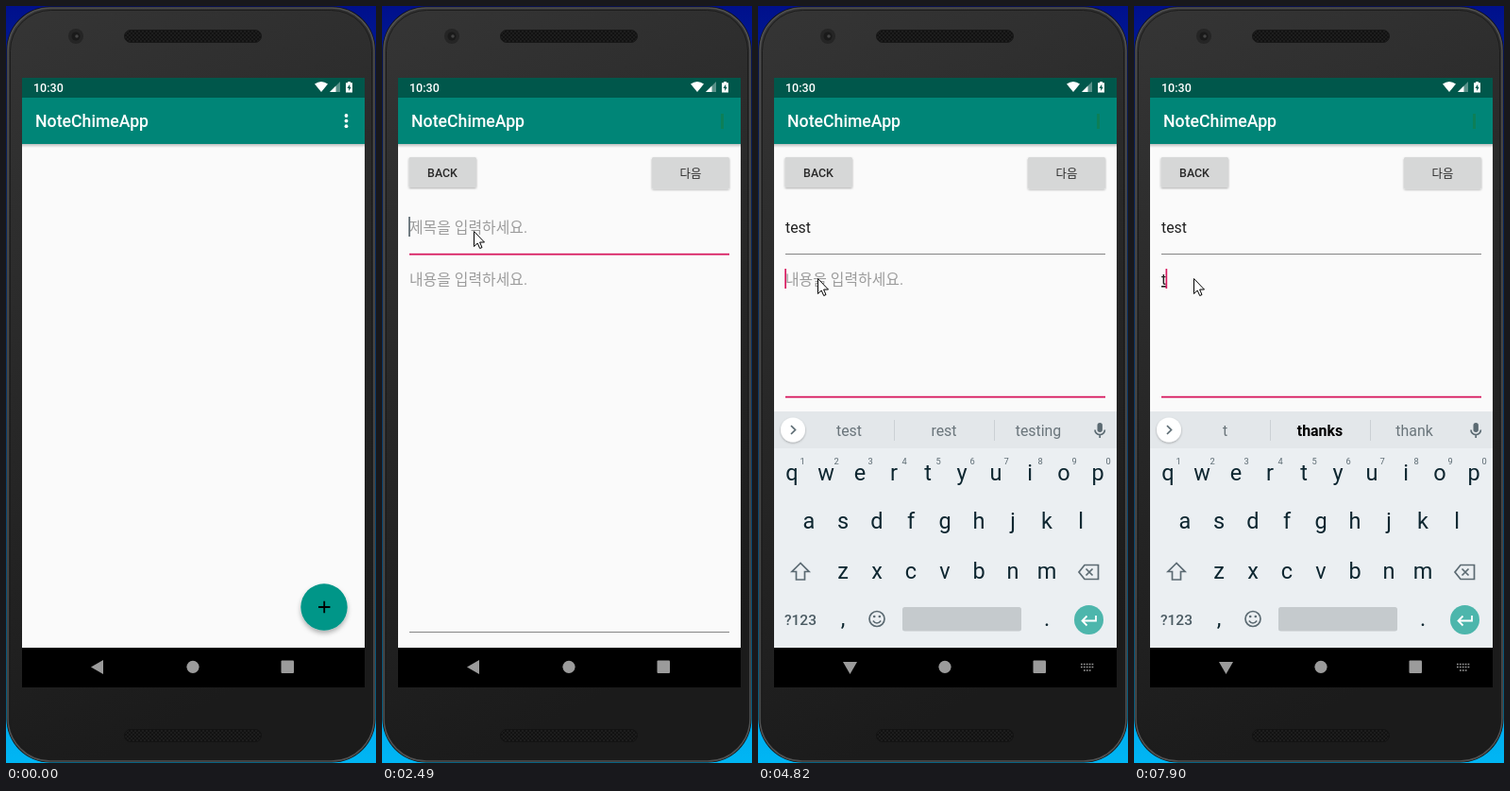
These frames come from a looping animation (392x801 px, 8 s). An HTML page:

```html
<!DOCTYPE html>
<html lang="ko">
<head>
<meta charset="utf-8">
<title>Memo screen</title>
<style>
  html, body { margin: 0; width: 100%; height: 100%; overflow: hidden; background: #000; }
  svg { display: block; width: 392px; height: 801px; }
  text { font-family: Roboto, "Noto Sans CJK KR", "Noto Sans CJK", sans-serif; white-space: pre; }
  .medium { font-weight: 500; }
  .mid { text-anchor: middle; }
  .field { font-size: 15.9px; fill: #212121; }
  .hint { font-size: 15.9px; fill: #9c9c9c; }
  .button { font-size: 12.4px; fill: #2a2a2a; }
  .key { font-size: 23.5px; fill: #0d2630; text-anchor: middle; }
  .digit { font-size: 9.3px; fill: #5c6b73; text-anchor: middle; }
  .word { font-size: 15.9px; fill: #6a757b; text-anchor: middle; }
  .strong { font-weight: 700; fill: #000; }
  .icon { fill: none; stroke: #5b6a72; stroke-width: 1.7; }
</style>
</head>
<body>
<svg viewBox="0 0 392 801">
  <defs>
    <linearGradient id="desk" x2="0" y2="1">
      <stop offset="0" stop-color="#00108c"/><stop offset=".5" stop-color="#0560c0"/><stop offset="1" stop-color="#00b6f4"/>
    </linearGradient>
    <linearGradient id="shell" x2=".25" y2="1">
      <stop offset="0" stop-color="#353535"/><stop offset=".45" stop-color="#292929"/><stop offset="1" stop-color="#1b1b1b"/>
    </linearGradient>
    <linearGradient id="fall" x2="0" y2="1">
      <stop offset="0" stop-opacity=".24"/><stop offset="1" stop-opacity="0"/>
    </linearGradient>
    <pattern id="mesh" width="4" height="4" patternUnits="userSpaceOnUse">
      <rect width="4" height="4" fill="#1d1d1d"/><circle cx="1" cy="1" r=".9" fill="#0c0c0c"/><circle cx="3" cy="3" r=".9" fill="#0c0c0c"/>
    </pattern>
    <filter id="lift" x="-30%" y="-30%" width="160%" height="170%">
      <feDropShadow dx="0" dy="3" stdDeviation="2.6" flood-opacity=".3"/>
    </filter>
    <filter id="edge" x="-10%" y="-20%" width="120%" height="150%">
      <feDropShadow dx="0" dy="1" stdDeviation=".8" flood-opacity=".3"/>
    </filter>
    <clipPath id="screen"><rect x="17" y="76" width="363" height="645"/></clipPath>
  </defs>

  <rect width="392" height="801" fill="url(#desk)"/>
  <rect x=".5" y=".5" width="391" height="800" rx="46" fill="#111"/>
  <rect x="2" y="2" width="388" height="797" rx="45" fill="url(#shell)" stroke="#505050" stroke-width="1.6"/>
  <rect x="4.5" y="4.5" width="383" height="792" rx="43" fill="none" stroke="#1c1c1c"/>
  <rect x="125.5" y="25.5" width="145" height="13" rx="6.5" fill="url(#mesh)" stroke="#171717"/>
  <rect x="125.5" y="765.5" width="145" height="13" rx="6.5" fill="url(#mesh)" stroke="#131313"/>
  <circle cx="74" cy="32" r="8" fill="#252525"/>
  <circle cx="74" cy="32" r="4.5" fill="#1a1a1a"/>
  <circle cx="75" cy="32" r="1.8" fill="#444"/>

  <g clip-path="url(#screen)">
    <rect x="17" y="76" width="363" height="603" fill="#fafafa"/>
    <rect x="17" y="146" width="363" height="4" fill="url(#fall)"/>
    <rect x="17" y="76" width="363" height="21" fill="#00574b"/>
    <rect x="17" y="97" width="363" height="49" fill="#008577"/>
    <rect x="17" y="679" width="363" height="42"/>
    <text class="medium" x="29" y="91" font-size="12.5" fill="#fff">10:30</text>
    <text class="medium" x="31" y="128" font-size="17.7" fill="#fff">NoteChimeApp</text>
    <path d="M334 91L327 82.5Q334 77.5 341 82.5Z" fill="#fff"/>
    <path d="M343 91L354 80V91Z" fill="#fff" opacity=".35"/>
    <path d="M343 91L349.500 84.500V91Z" fill="#fff"/>
    <path d="M362 80h3v1.300h2V91.500h-7V81.300h2Z" fill="#fff"/>
    <path d="M364.200 82.800l-2.700 4.200h1.700v3l2.500-4.200h-1.500Z" fill="#00574b"/>
    <rect x="359" y="114" width="3" height="16" fill="#0c7f58"/>
    <g id="home">
      <rect x="358" y="113" width="5" height="18" fill="#008577"/>
      <g fill="#fff"><circle cx="360.500" cy="116" r="1.900"/><circle cx="360.500" cy="121.600" r="1.900"/><circle cx="360.500" cy="127.200" r="1.900"/></g>
      <circle cx="337" cy="636" r="24.700" fill="#009688" filter="url(#lift)"/>
      <path d="M331 636h12.400M337.200 629.800v12.400" stroke="#000" stroke-width="1.800"/>
    </g>

    <g id="edit">
      <g fill="#d6d7d7" filter="url(#edge)">
        <rect x="28.500" y="160" width="71.500" height="32" rx="1.500"/>
        <rect x="286" y="160" width="82" height="33.500" rx="1.500"/>
      </g>
      <text class="button medium mid" x="64" y="181">BACK</text>
      <text class="button mid" x="327" y="181.500">다음</text>
      <text class="hint" id="titleHint" x="29" y="240">제목을 입력하세요.</text>
      <text class="field" id="title" x="29" y="240"></text>
      <rect id="titleCaret" y="223" width="1.400" height="21" fill="#37474f"/>
      <rect id="titleLine" x="29" width="339"/>
      <text class="hint" id="bodyHint" x="29" y="295">내용을 입력하세요.</text>
      <text class="field" id="body" x="29" y="295"></text>
      <rect id="bodyCaret" y="278" width="1.700" height="21" fill="#d81b60"/>
      <rect id="bodyLine" x="29" width="339"/>
    </g>

    <g id="keyboard">
      <rect x="17" y="429" width="363" height="250" fill="#ebeff2"/>
      <rect x="17" y="429" width="363" height="39" fill="#e3e7ea"/>
      <path d="M144.500 438v22M250.500 438v22" stroke="#cbd0d4"/>
      <circle cx="37" cy="448.500" r="13" fill="#fff" filter="url(#edge)"/>
      <path class="icon" d="M35 444l4.500 4.500-4.500 4.500"/>
      <text class="word" x="96.500" y="455"></text>
      <text class="word" x="197" y="455"></text>
      <text class="word" x="297" y="455"></text>
      <rect x="359.500" y="441" width="5.400" height="10" rx="2.700" fill="#5b6a72"/>
      <path class="icon" d="M357 448.500a5.200 5.200 0 0 0 10.400 0M362.200 453.500v3.500"/>
      <g id="keys"></g>
      <path class="icon" d="M45 589.500l-9 9h4.500v8.500h9v-8.500h4.500Z"/>
      <path class="icon" d="M346 591.500h14.500v15H346l-6-7.500ZM347.500 595.500l7 7M354.500 595.500l-7 7"/>
      <text class="medium mid" x="45" y="654.500" font-size="15.500" fill="#4b5b63">?123</text>
      <circle class="icon" cx="126" cy="648.500" r="8"/>
      <path class="icon" d="M121.800 650.500q4.200 5 8.400 0"/>
      <circle cx="123.200" cy="646" r="1.300" fill="#5b6a72"/><circle cx="128.800" cy="646" r="1.300" fill="#5b6a72"/>
      <rect x="153" y="636" width="126" height="25.500" rx="2.500" fill="#c5cacd"/>
      <circle cx="350.500" cy="649.500" r="15.500" fill="#4db6ac"/>
      <path d="M358 645v5.500H344M348.500 645.500l-5 5 5 5" fill="none" stroke="#fff" stroke-width="1.800"/>
    </g>

    <g fill="#9b9b9b">
      <path id="back"/>
      <circle cx="198" cy="699.300" r="6.600"/>
      <rect x="291.500" y="692.500" width="13.500" height="13.500" rx="1"/>
      <path id="switcher" d="M342 696.500h14M342 699.500h14M345 703h8" stroke="#9b9b9b" stroke-width="1.500" stroke-dasharray="1.700 1.200"/>
    </g>
  </g>
  <path id="pointer" d="M.5.5V16.500L4.200 13 6.700 18.500 9 17.500 6.600 12H11.500Z" fill="#fff" stroke="#000"/>
</svg>
<script>
const LOOP = 8000;
const $ = id => document.getElementById(id);
const words = [...document.querySelectorAll(".word")];

// Each row: start time, then the values held until the next row.
const pointerSteps = [
  [220, 331, 737], [295, 333, 712], [370, 336, 678], [445, 338, 655], [520, 339, 646],
  [1100, 250, 520], [1175, 110, 322], [1250, 56, 257],
  [1480, 59, 241], [1558, 73, 231], [1635, 86, 229], [1712, 94, 234], [1790, 97, 238],
  [4280, 95, 242], [4357, 90, 251], [4434, 83, 263], [4511, 75, 274], [4588, 68, 283], [4665, 63, 288]
];
const fadeSteps = [[0, 0], [690, .15], [770, .5], [850, .85], [930, 1]];
const keyboardSteps = [[3420, 62, .49], [3497, 28, .76], [3573, 8, .95], [3650, 0, 1]];
const titleSteps = [[0, ""], [3420, "te"], [3573, "tes"], [3650, "test"]];
const bodySteps = [
  [0, ""], [5360, "t"], [5510, "te"], [5590, "tes"], [5740, "tesets"],
  [6597, "teset"], [6674, "tese"], [6828, "tes"], [6982, "te"], [7136, "t"], [7290, ""], [7830, "t"]
];
// A leading * marks the bold suggestion.
const wordSteps = [
  [0, "test rest testing"], [5130, "Thanks I The"], [5360, "t *thanks thank"], [5510, "te *the yes"],
  [5590, "tese *these year"], [5740, "tesets *resets theses"], [6597, "teset *reset tests"],
  [6674, "tese *these year"], [6982, "te *the yes"], [7136, "t *thanks thank"],
  [7370, "Thanks I The"], [7900, "t *thanks thank"]
];
const titleCaretSteps = [[0, 0], [2490, 1], [3190, 0], [3420, 1], [4050, 0]];
const bodyCaretSteps = [[0, 0], [4820, 1], [6290, 0], [6520, 1]];
const TITLE_FOCUS = 2340, BODY_FOCUS = 4820;

const at = (steps, t) => steps.findLast(row => row[0] <= t);
const show = (el, on) => el.setAttribute("visibility", on ? "inherit" : "hidden");

function drawKeys() {
  const rows = [["qwertyuiop", 36, 502], ["asdfghjkl", 54, 553], ["zxcvbnm", 90, 606], [",", 90, 656], [".", 306, 656]];
  $("keys").innerHTML = rows.map(([letters, x, y], r) => [...letters].map((c, i) => {
    const cx = x + 36 * i;
    const digit = r ? "" : `<text class="digit" x="${cx + 11}" y="485">${(i + 1) % 10}</text>`;
    return `<text class="key" x="${cx}" y="${y}">${c}</text>${digit}`;
  }).join("")).join("");
}

function setField(name, text, caretOn, focused, composing, lineY) {
  const field = $(name), line = $(name + "Line");
  if (field.textContent !== text) field.textContent = text;
  field.setAttribute("text-decoration", composing ? "underline" : "none");
  show($(name + "Hint"), !text);
  show($(name + "Caret"), caretOn);
  $(name + "Caret").setAttribute("x", 28.3 + (text ? field.getComputedTextLength() : 0));
  line.setAttribute("y", lineY - (focused ? .2 : 0));
  line.setAttribute("height", focused ? 1.8 : 1);
  line.setAttribute("fill", focused ? "#d81b60" : "#858585");
}

function render(t) {
  const fade = at(fadeSteps, t)[1];
  $("home").setAttribute("opacity", 1 - fade);
  $("edit").setAttribute("opacity", fade);

  const keyboard = at(keyboardSteps, t);
  show($("keyboard"), keyboard);
  show($("switcher"), keyboard);
  if (keyboard) {
    $("keyboard").setAttribute("transform", `translate(0 ${keyboard[1]})`);
    $("keyboard").setAttribute("opacity", keyboard[2]);
  }
  $("back").setAttribute("d", keyboard ? "M90 694H105L97.5 707Z" : "M90 699.5L103 692V707Z");

  const inBody = t >= BODY_FOCUS;
  setField("title", at(titleSteps, t)[1], at(titleCaretSteps, t)[1], t >= TITLE_FOCUS && !inBody, !inBody, 262);
  setField("body", at(bodySteps, t)[1], at(bodyCaretSteps, t)[1], inBody, true, keyboard ? 413 : 662);

  at(wordSteps, t)[1].split(" ").forEach((word, i) => {
    words[i].textContent = word.replace("*", "");
    words[i].classList.toggle("strong", word[0] === "*");
  });

  const pointer = at(pointerSteps, t);
  show($("pointer"), pointer);
  if (pointer) $("pointer").setAttribute("transform", `translate(${pointer[1]} ${pointer[2]})`);
}

drawKeys();
const start = performance.now();
function tick() {
  render((performance.now() - start) % LOOP);
  requestAnimationFrame(tick);
}
tick();
</script>
</body>
</html>
```
